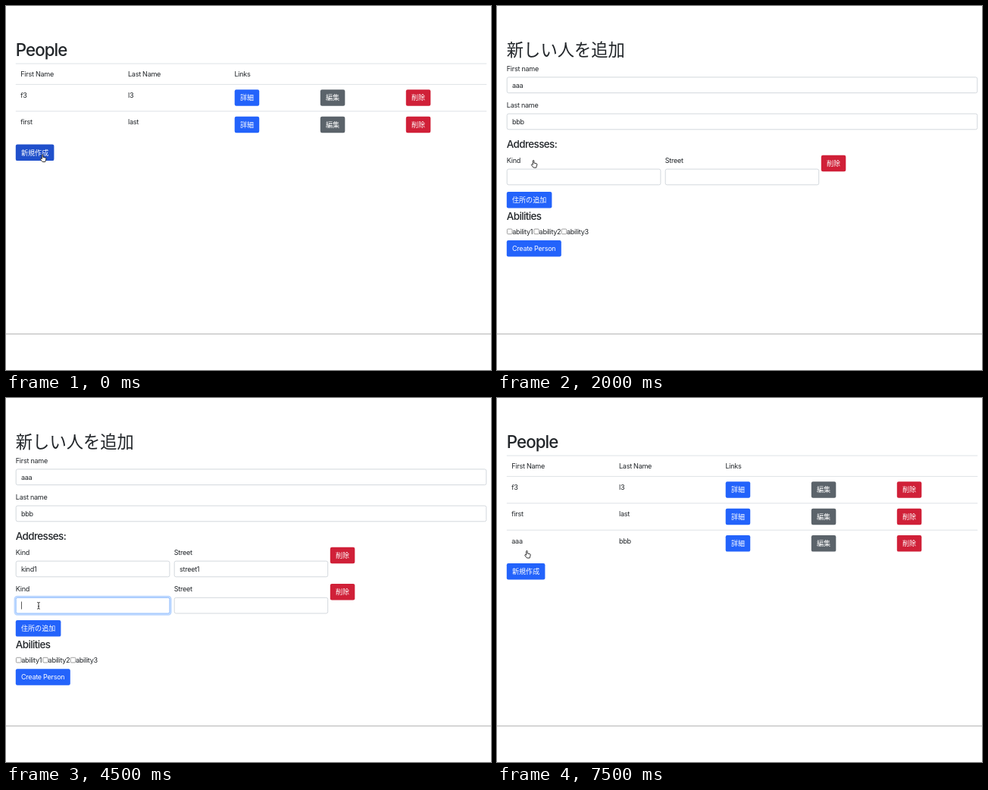
Recreate the animation shown at these times as an HTML page. Size 640x480 px, loop 8 s.

```html
<!DOCTYPE html>
<html lang="ja">
<head>
<meta charset="utf-8">
<title>People</title>
<style>
  html, body { margin: 0; width: 100%; height: 100%; overflow: hidden; background: #fff; }
  svg { display: block; width: 640px; height: 480px; }
  text {
    font: 400 9.05px Inter, "Noto Sans CJK JP", "Noto Sans CJK", sans-serif;
    letter-spacing: -.03em; fill: #212529; white-space: pre;
  }
  .ja { font-family: "Noto Sans CJK JP", "Noto Sans CJK", sans-serif; letter-spacing: 0; }
  .h1 { font-size: 22.3px; font-weight: 500; letter-spacing: -.043em; }
  .h1.ja { font-weight: 400; letter-spacing: 0; }
  .h4 { font-size: 13.45px; font-weight: 500; letter-spacing: -.046em; }
  .label { fill: #fff; }
  .label.ja { font-weight: 500; }
</style>
</head>
<body>
<svg id="stage" viewBox="0 0 640 480" xmlns="http://www.w3.org/2000/svg"></svg>
<script>
const NS = "http://www.w3.org/2000/svg";
const stage = document.getElementById("stage");
const BLUE = "#2363fb", BLUE_HOVER = "#2050cb", GRAY = "#5b636a", RED = "#d02038";
const STEP = 500, ROW = 48.2, LIST_ROW = 35.4;

function add(tag, attrs) {
  const el = document.createElementNS(NS, tag);
  for (const key in attrs) el.setAttribute(key, attrs[key]);
  return stage.appendChild(el);
}

function text(x, y, str, cls = "") {
  const ja = /[^\x00-\x7f]/.test(str) ? " ja" : "";
  const el = add("text", { x, y, class: cls + ja });
  el.textContent = str;
  return el;
}

function box(x, y, width, height, attrs) {
  return add("rect", { x, y, width, height, rx: 2.2, ...attrs });
}

function line(y, stroke, x1 = 12.8, x2 = 634.2) {
  add("line", { x1, x2, y1: y, y2: y, stroke, "stroke-width": 1 });
}

function button(x, y, width, str, fill = BLUE) {
  box(x, y, width, 21.5, { fill });
  text(x + 7.2, y + 14, str, "label");
}

// focus: 0 = none, 1 = ring, 2 = ring and caret
function input(x, y, width, value = "", focus = 0) {
  if (focus) {
    box(x - 1.1, y - 1.1, width + 2.2, 23.7, {
      rx: 3.2, fill: "none", stroke: "#0d6efd", "stroke-opacity": .27, "stroke-width": 2.3
    });
  }
  box(x + .4, y + .4, width - .8, 20.7, {
    fill: "#fff", stroke: focus ? "#86b7fe" : "#ced4da", "stroke-width": .9
  });
  const el = text(x + 7.2, y + 14, value);
  if (focus === 2) {
    const end = value ? el.getComputedTextLength() : 0;
    add("rect", { x: x + 7.4 + end, y: y + 5.6, width: .8, height: 10, fill: "#333" });
  }
}

const cursors = {
  hand: {
    d: "M2.3 6.4V1.3a.8.8 0 0 1 1.6 0V4.1L7 4.7Q8 5 7.9 6L7.3 8.4 6.8 10.1H3.2L.6 7Q.1 6.2.8 5.7T2.3 6.4Z",
    fill: "#fff", stroke: "#111", "stroke-width": .85
  },
  beam: {
    d: "M-1.8-4.4Q0-4.4 0-3.3 0-4.4 1.8-4.4M0-3.3V3.3M-1.8 4.4Q0 4.4 0 3.3 0 4.4 1.8 4.4M-1 .9H1",
    fill: "none", stroke: "#222", "stroke-width": .9
  },
  arrow: {
    d: "M0 0V8.6L2 6.8 3.4 10 4.9 9.3 3.5 6.2H6.2Z",
    fill: "#111", stroke: "#fff", "stroke-width": .6
  }
};

function cursor([kind, x, y]) {
  add("path", { ...cursors[kind], transform: `translate(${x} ${y})` });
}

function list({ people, hover }) {
  text(12.8, 66.2, "People", "h1");
  line(76, "#dee2e6");
  text(19.3, 93, "First Name");
  text(161, 93, "Last Name");
  text(301.5, 93, "Links");
  people.forEach(([first, last], i) => {
    const y = 103.4 + i * LIST_ROW;
    line(y, "#dee2e6");
    text(19.3, y + 17.5, first);
    text(161, y + 17.5, last);
    button(301.7, y + 6.9, 32.5, "詳細");
    button(414.8, y + 6.9, 32.5, "編集", GRAY);
    button(527.8, y + 6.9, 32.5, "削除", RED);
  });
  button(12.8, 111.8 + people.length * LIST_ROW, 50.6, "新規作成", hover ? BLUE_HOVER : BLUE);
}

function form({ first, last, rows = [], focus, caret = true, hover }) {
  const on = name => focus === name ? (caret ? 2 : 1) : 0;
  text(12.8, 66.4, "新しい人を追加", "h1");
  text(12.8, 86, "First name");
  input(12.8, 93.5, 621.4, first, on("first"));
  text(12.8, 134.1, "Last name");
  input(12.8, 141.7, 621.4, last, on("last"));
  text(12.8, 187.3, "Addresses:", "h4");
  rows.forEach(([kind, street], i) => {
    const y = 196.7 + i * ROW;
    text(12.8, y + 10.3, "Kind");
    input(12.8, y + 18, 203.5, kind, on("kind" + i));
    text(221.8, y + 10.3, "Street");
    input(221.8, y + 18, 203.3, street, on("street" + i));
    button(427.8, y, 32.5, "削除", RED);
  });
  const y = 196.7 + rows.length * ROW;
  button(12.8, y, 59.6, "住所の追加", hover ? BLUE_HOVER : BLUE);
  text(12.8, y + 36.6, "Abilities", "h4");
  [13, 48.4, 84.8].forEach((x, i) => {
    box(x + .4, y + 49.2, 6.6, 6.6, { rx: 1.2, fill: "#fff", stroke: "#777", "stroke-width": .7 });
    text(x + 7.2, y + 56.1, "ability" + (i + 1));
  });
  button(12.8, y + 64.1, 72, "Create Person");
}

const before = [["f3", "l3"], ["first", "last"]];
const after = [...before, ["aaa", "bbb"]];
const named = { view: form, first: "aaa", last: "bbb" };
const row1 = ["kind1", "street1"];

// one entry per half second
const steps = [
  { view: list, people: before, hover: true, cursor: ["hand", 45, 195.4] },
  { view: form, cursor: ["hand", 45, 195.4] },
  { view: form, first: "aaa", focus: "first" },
  { view: form, first: "aaa", last: "b", focus: "last" },
  { ...named, rows: [[]], cursor: ["hand", 45, 203] },
  { ...named, rows: [[]], focus: "kind0", caret: false, cursor: ["beam", 56.3, 230.6] },
  { ...named, rows: [["kind1"]], focus: "kind0" },
  { ...named, rows: [["kind1", "street"]], focus: "street0" },
  { ...named, rows: [row1], focus: "street0", hover: true, cursor: ["hand", 39.5, 256] },
  { ...named, rows: [row1, []], focus: "kind1", cursor: ["beam", 43, 273.8] },
  { ...named, rows: [row1, ["kind2"]], focus: "kind1" },
  { ...named, rows: [row1, ["kind2", "stree"]], focus: "street1" },
  { ...named, rows: [row1, ["kind2", "street2"]], focus: "street1", cursor: ["arrow", 37.6, 387.8] },
  { view: list, people: after, cursor: ["hand", 35, 359] },
  { view: list, people: after, cursor: ["arrow", 38, 290] },
  { view: list, people: after, cursor: ["hand", 36.3, 200.9] }
];

let shown = -1;
const start = performance.now();

function tick(now) {
  const index = Math.floor(Math.max(0, now - start) / STEP) % steps.length;
  if (index !== shown) {
    shown = index;
    const step = steps[index];
    stage.textContent = "";
    line(432.5, "#b4b4b4", 0, 640);
    step.view(step);
    if (step.cursor) cursor(step.cursor);
  }
  requestAnimationFrame(tick);
}
tick(start);
</script>
</body>
</html>
```
